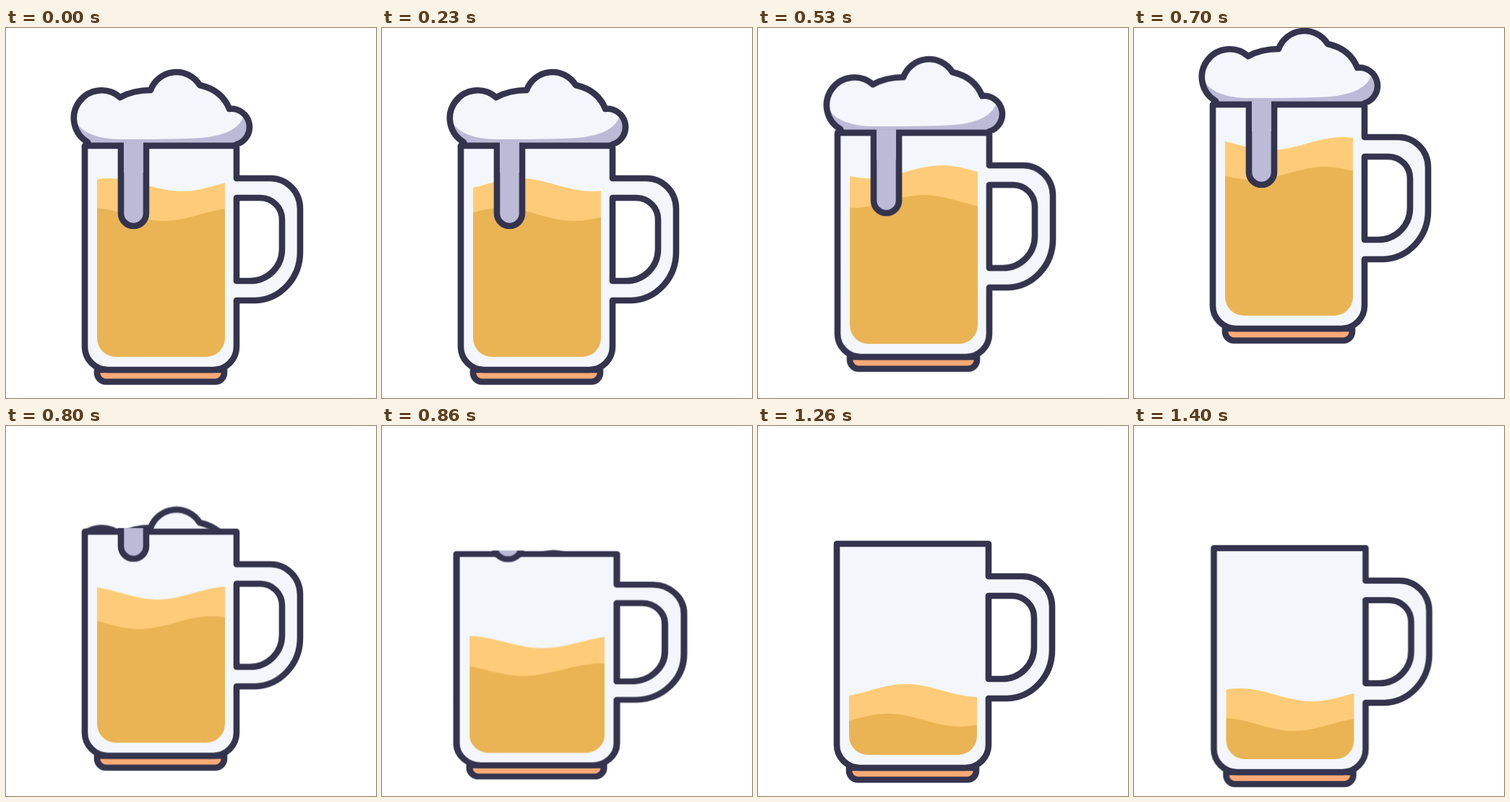
Write an HTML page without scripts that moves like this. It is 512 px wide and 512 px high and loops after 1430 ms.

```html
<!DOCTYPE html>
<html lang="en">
<head>
<meta charset="utf-8">
<title>Beer mug</title>
<style>
  html, body { margin: 0; height: 100%; overflow: hidden; background: #fff; }
  svg { display: block; width: 100vw; height: 100vh; }

  .line { stroke: #34344e; stroke-width: 8.6; stroke-linejoin: round; stroke-linecap: round; }
  .glass { fill: #f3f7fb; }
  .hole { fill: #fff; }
  .base { fill: #fdaa77; }
  .foam-fill { fill: #f3f7fb; }
  .shade { fill: #bbbbd7; }
  .back { fill: #fecc78; }
  .front { fill: #eab455; }

  .mug, .level, .wave, .foam, .drip { animation: 1430ms linear infinite; }
  .mug { animation-name: hop; transform-origin: 214px 411px; }
  .level { animation-name: drain; }
  .wave { animation-name: slosh; }
  .foam { animation-name: sink; }
  .drip { animation-name: retract; }

  /* rest, quick dip, leap, squashed landing, rest, next dip */
  @keyframes hop {
    0%, 21% { transform: translate(0, 0); animation-timing-function: ease-out; }
    28% { transform: translate(1.5px, 18px); }
    31% { transform: translate(1.5px, 7px); }
    37.4% { transform: translate(1px, -19px); }
    49% { transform: translate(0, -57px); animation-timing-function: ease-out; }
    51.5% { transform: translate(0, -60px); animation-timing-function: ease-in; }
    57% { transform: translate(0, 0) scale(1); }
    59.4% { transform: translate(0, 0) scale(1.06, .94); }
    60.5% { transform: translate(0, 0) scale(1.055, .944); animation-timing-function: ease-in-out; }
    67%, 89.5% { transform: translate(0, 0) scale(1); animation-timing-function: ease-out; }
    94.8% { transform: translate(1.5px, 18px); }
    97.9%, 100% { transform: translate(1.5px, 6px); }
  }
  @keyframes drain {
    0%, 48.95% { transform: translateY(0); animation-timing-function: ease-in-out; }
    71.4%, 100% { transform: translateY(149px); }
  }
  @keyframes slosh {
    0% { transform: translateX(0); }
    97.7% { transform: translateX(290px); }
    97.71%, 100% { transform: translateX(2px); }
  }
  @keyframes sink {
    0%, 49% { transform: translateY(0); animation-timing-function: ease-in-out; }
    60.14% { transform: translateY(100px); }
    63%, 100% { transform: translateY(115px); }
  }
  @keyframes retract {
    0%, 49% { transform: translateY(0); animation-timing-function: ease-in-out; }
    60.14% { transform: translateY(-103px); }
    63%, 100% { transform: translateY(-124px); }
  }
</style>
</head>
<body>
<svg viewBox="0 0 512 512">
  <defs>
    <clipPath id="above-rim"><path d="M0-200H512V163H0Z"/></clipPath>
    <clipPath id="below-rim"><path d="M0 158.500H512V512H0Z"/></clipPath>
    <clipPath id="inside"><path d="M126 163H303V429a26 26 0 0 1-26 26H152a26 26 0 0 1-26-26Z"/></clipPath>
    <path id="swell" d="M-257 208c36 0 64 18 100 18s64-18 100-18 64 18 100 18 64-18 100-18 64 18 100 18 64-18 100-18 64 18 100 18 64-18 100-18V700H-257Z"/>
  </defs>

  <g class="mug">
    <path class="base line" d="M126 473v4a12 12.500 0 0 0 12 12.500H290a12 12.500 0 0 0 12-12.500v-4Z"/>

    <g clip-path="url(#above-rim)">
      <g class="foam">
        <path id="cloud" class="foam-fill" d="M113 158A38.500 38.500 0 1 1 158 96Q176 86 200 86A38 38 0 0 1 268 79Q299 86 309 112A25.100 25.100 0 0 1 319 161L317 163H115Z"/>
        <path class="shade" d="M97 131Q113 154 160 154Q240 154 270 152Q322 148 330 119Q344 146 319 163H115Q99 150 97 131Z"/>
        <use href="#cloud" class="line" style="fill-opacity:0"/>
      </g>
    </g>

    <path class="glass line" d="M109 163H319V208H366a41 42 0 0 1 41 42V310a64 67 0 0 1-62 67H319V441a32 32 0 0 1-32 32H141a32 32 0 0 1-32-32Z"/>
    <path class="hole line" d="M319 235V350H338a44 44 0 0 0 44-44V265a30 30 0 0 0-30-30Z"/>

    <g clip-path="url(#inside)">
      <g class="level">
        <use href="#swell" class="back wave"/>
        <g transform="translate(-25 41)"><use href="#swell" class="front wave"/></g>
      </g>
    </g>

    <g clip-path="url(#below-rim)">
      <path class="drip shade line" d="M159 163V256.500a17.500 17.500 0 0 0 35 0V163"/>
      <path class="drip shade" d="M163 60H190V200H163Z"/>
    </g>
  </g>
</svg>
</body>
</html>
```
